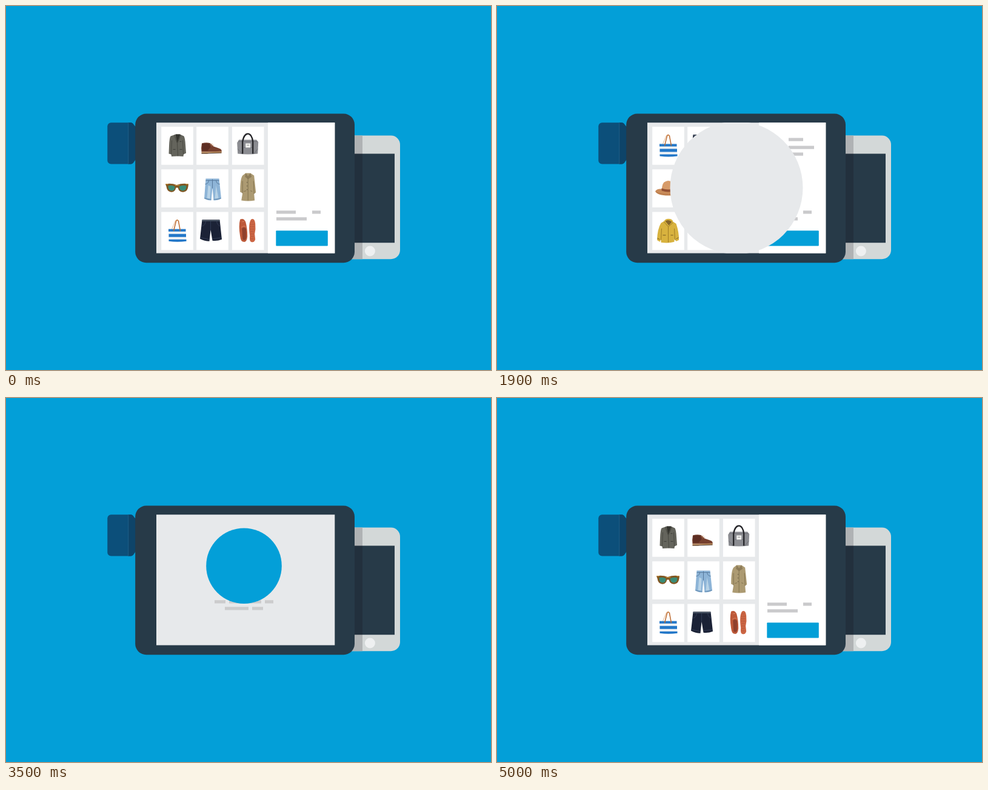
These frames come from a looping animation (800x600 px, 5100 ms). An HTML page with a canvas:

```html
<!DOCTYPE html>
<html lang="en">
<head>
<meta charset="utf-8">
<title>Tablet checkout</title>
<style>
html, body { margin: 0; width: 100%; height: 100%; overflow: hidden; background: #039fd8; }
canvas { display: block; }
</style>
</head>
<body>
<canvas id="stage" width="800" height="600"></canvas>
<script>
const ctx = document.getElementById('stage').getContext('2d');
const BLUE = '#039fd8', DARK = '#273a48', PALE = '#e7e9eb', SILVER = '#d3d8d8', BAR = '#cacacc';
const LOOP = 5100, TICK = 100;
const SCREEN = { x: 248, y: 192.3, w: 294.3, h: 215.2 };
const COLS = [282.5, 340.5, 399.2], ROW_TOP = 230.4, PITCH = 70.2;

const clamp = (v, lo = 0, hi = 1) => Math.min(hi, Math.max(lo, v));
const mix = (a, b, p) => a + (b - a) * p;

// Each layer is [path, colour, stroke width]; without a width it is filled.
const BLAZER = [
  ['M-5-18L-2-19H4L11-16Q13-12 13.500-2L14.500 12L10.500 14L10 17.500L1 17L-9.500 17.500L-10 14L-14 13L-13.500 0Q-13-13-11-16Z', '#64645c'],
  ['M-3-19L0-5L5-19Z', '#34342f'],
  ['M-5-18L0-4L1 17M6-18L0-4M-9-9L-10 14M9-9L10 14', '#484841', 1],
  ['M-7 6H-3M4 6H8M4-7H7', '#3d3d38', 1]
];
const BOOT = [
  ['M-17.500-4Q-11-6-4-4.500L2 1Q8 3 13 5Q16 7 15 10H-18Q-19 3-17.500-4Z', '#76402f'],
  ['M-17-4L-5-4L-3 2L-8 8H-17Z', '#5d2e23'],
  ['M-18 10H-6L15 9V12H-6L-8 13H-18Z', '#c0905f'],
  ['M-18 12.500H-8L15 11.500', '#443029', 1],
  ['M-4-2L0-3M-2 0L2-1', '#c08b63', .8]
];
const DUFFEL = [
  ['M-15-10H14L17-6L16 13Q0 15-17 13L-18-5Z', '#8b8c91'],
  ['M-16-7H16M-17 5L-10 13M10 13L16 5M-7 3H7', '#717278', 1],
  ['M-9 13V-7C-6-24 6-24 8-7V13', '#242428', 2.300],
  ['M-4-4H4V3H-4Z', '#f1f1ef'],
  ['M-2-1H2', '#777', .8]
];
const GLASSES = [
  ['M-19.500-7Q-10-9-1-5.500Q9-9 18.500-7L18-3Q17 5 11 6Q3 7 1-1H-2Q-4 7-11 6Q-17 5-18-3Z', '#805622'],
  ['M-15-4Q-9-6-4-3Q-4 4-9 4Q-15 4-15-4Z', '#398b76'],
  ['M3-3Q9-6 15-4Q15 4 9 4Q4 4 3-3Z', '#398b76'],
  ['M-19-7L-15-7M14-7L18-7M-4-5H4', '#c28d39', 1.300]
];
const DENIM = [
  ['M-11-16H11L14.500 17Q9 20 2 20L0-1L-2 20Q-8 20-13.500 17Z', '#8db4d7'],
  ['M-7-5L-9 16L-4 17L-3-3ZM6-5L4 17L10 16Z', '#b7d2e6'],
  ['M-11-13H11M0-15L0 0M-12-7Q-7-7-6-13M12-7Q7-7 6-13', '#56799c', 1],
  ['M-13 16Q-8 19-2 18M2 18Q9 19 14 16', '#6a91b5', 1.300]
];
const TRENCH = [
  ['M-4-25H4L10-21L13 7L10 9L11 20Q0 22-11 20L-9 8L-13 6Q-13-16-9-21Z', '#ac9a72'],
  ['M-4-25L0-20L4-25L6-19L0-15L-5-19Z', '#8d7c59'],
  ['M0-18V20M-9-12L-9 8M9-12L10 9M-7 5L-3 4M4 4L7 5', '#837350', 1],
  ['M-2-10H-1M-2-4H-1M-2 2H-1', '#514634', 1.300]
];
const TOTE = [
  ['M-14.500-4H14L15 17Q0 19-14 17Z', '#f0f3f6'],
  ['M-14.500-3H14V1H-14.500ZM-14 5H14.500V10H-14ZM-14 14H15V17Q0 19-14 17Z', '#2377c8'],
  ['M-6 0L-2-16Q0-20 2-16L5 0', '#bd6c32', 1.500],
  ['M-9-3L-3-17Q0-20 3-16', '#d99760', .7]
];
const NAVY = [
  ['M-17-18.500H12L15.500 14Q8 17 0 16L-3-2L-5 17Q-13 17-20.500 13Z', '#1b2236'],
  ['M-17-17H12', '#566371', 1.500],
  ['M-3-16V-2M-17-8Q-12-9-11-16M13-8Q8-9 7-16M-19 11L-5 14M0 13L15 11', '#37415a', .8]
];
const LOAFERS = [
  ['M-13-19Q-7-22-4-15Q-1-4-1 9Q-2 19-7 18Q-12 18-13 9Q-16-9-13-19Z', '#bd5939'],
  ['M-10-4Q-6-8-3-3L-3 12Q-5 17-9 14Z', '#8f412d'],
  ['M-11-6Q-6-10-3-6M-10-15L-6-16', '#dc8260', 1],
  ['M5-19Q11-22 12-12Q13-3 11 5L12 14Q10 20 5 18Q2 17 3 8Q0-12 5-19Z', '#cc6543'],
  ['M5-15H10M4-11H11M4-7H11M4-3H11M5 1H10M5 5H10M5 9H10M5 13H10', '#93452f', 1, [1, 1.500]]
];
const HAT = [
  ['M-21.500 5Q-19 0-10 1H9Q19 0 20.500 5Q17 12 0 12Q-18 12-21.500 5Z', '#c98b59'],
  ['M-11 4Q-10-10-5-11Q0-14 5-11Q10-9 11 4Q0 7-11 4Z', '#d79b69'],
  ['M-11 0Q0 4 11 0V4Q0 8-11 4Z', '#925033'],
  ['M-20 6Q-13 10 0 10Q13 10 19 6', '#b27446', 1]
];
const POLO = [
  ['M-6-18L-1-19H5L10-17Q16-13 20-2L13 3L11-1L12 20Q0 23-12 21L-11-1L-14 3L-19.500-2Q-16-13-11-16Z', '#d24150'],
  ['M-5-18L0-11L6-18L3-19H-2Z', '#922633'],
  ['M-6-18L-4-12L0-14L5-11L7-17M0-14V-4M-11-7L-11 18M11-7L11 18', '#b22f40', 1],
  ['M-19-3L-14 1M13 1L19-3', '#e66c76', 1]
];
const SATCHEL = [
  ['M-7-11Q-7-16 0-16Q8-16 8-11', '#5d3030', 1.500],
  ['M-18-11Q0-13 18-11L19 14Q0 16-18 14Z', '#46191d'],
  ['M-18-10H18L17 2Q0 5-18 2Z', '#5b2024'],
  ['M-11-9V12M11-9V12', '#a12e34', 2.600],
  ['M-12 4H-10M10 4H12M-16-7H-13', '#d8a18c', 1.500],
  ['M-18 3Q0 6 18 3', '#2c1216', 1]
];
const PARKA = [
  ['M-7-16Q-5-20 0-20Q7-20 8-15L13-12Q18 3 17.500 15L13 17L10 13V18Q0 21-12 19V13L-14 18L-18.500 15Q-18-3-12-13Z', '#d8b23e'],
  ['M-5-16Q0-20 6-15L1-9Z', '#85652a'],
  ['M-7-15L0-7L8-14M0-7V19M-11-4L-12 15M10-4L11 15', '#a17d25', 1],
  ['M-9 7L-4 7M4 7L8 7M-14 14L-18 12M13 13L17 11', '#765c24', 1]
];
const PLAID = [
  ['M-5-22L3-23L8-20Q14-18 16-8L18 10L13 13L10 17Q0 20-10 16L-12 13L-17 10L-18 5Q-15-15-10-19Z', '#495875'],
  ['M-10-18V16M-5-21V17M0-21V18M5-20V18M10-17V16M15-8V11', '#26334f', 1],
  ['M-14-12H13M-15-6H16M-16 0H17M-17 6H17M-11 12H14', '#a9616a', .8],
  ['M-7-19V16M3-20V17M12-15V13', '#8fa0bb', .6],
  ['M-5-22L0-17L6-21L2-23Z', '#2d3448']
];
const CHINO = [
  ['M-10-18H10L13 17Q7 20 2 19L0-2L-2 19Q-7 20-12 17Z', '#6579a6'],
  ['M-10-16H10M0-17V-2M-11-9Q-7-10-6-16M11-9Q7-10 6-16M-7-2L-7 15M7-2L8 15', '#4c6089', 1]
];
const GOODS = [
  BLAZER, BOOT, DUFFEL, GLASSES, DENIM, TRENCH, TOTE, NAVY, LOAFERS,
  HAT, POLO, SATCHEL, PARKA, PLAID, CHINO
].map(layers => layers.map(([d, ...style]) => [new Path2D(d), ...style]));
const POLO_INDEX = 10;

function rect(x, y, w, h, color, radius = 0) {
  ctx.fillStyle = color;
  ctx.beginPath();
  ctx.roundRect(x, y, w, h, radius);
  ctx.fill();
}

function disc(x, y, r, color) {
  ctx.fillStyle = color;
  ctx.beginPath();
  ctx.arc(x, y, r, 0, Math.PI * 2);
  ctx.fill();
}

function bars(y, color, ...spans) {
  for (const [from, to] of spans) rect(from, y, to - from, 5.3, color);
}

function drawGood(index, x, y, scale = 1) {
  ctx.save();
  ctx.translate(x, y);
  ctx.scale(scale, scale);
  for (const [path, color, width, dash] of GOODS[index]) {
    ctx.setLineDash(dash || []);
    ctx.fillStyle = ctx.strokeStyle = color;
    if (width) {
      ctx.lineWidth = width;
      ctx.stroke(path);
    } else {
      ctx.fill(path);
    }
  }
  ctx.restore();
}

function drawPhone() {
  rect(540, 213.5, 110, 203.7, SILVER, 15);
  rect(540, 243.5, 101, 146.7, DARK);
  disc(600.4, 404, 8.5, '#eef0f1');
  rect(560, 213.5, 28, 203.7, '#afb2b4');
  rect(560, 243.5, 28, 146.7, '#22303d');
}

function drawReader() {
  rect(167.3, 192.2, 44, 68.2, '#0c4f7a', 6);
  ctx.fillStyle = '#0e4469';
  ctx.fill(new Path2D('M202 192.200H206Q209 192.200 211 196L214 199V253L211 257Q209 260.400 206 260.400H202Z'));
  rect(201, 192.2, 1.3, 68.2, '#1a5b85');
}

function drawSwipe(n) {
  if (n < 29 || n > 33) return;
  const bottom = 76.7 + 133 * (n - 29), length = 98;
  rect(140.3, bottom - length, 61.8, length, SILVER, 4);
  rect(177.3, bottom - length, 13.9, length, DARK);
}

function drawStore(n) {
  const scroll = 2 * PITCH * clamp((n - 1) / 3);
  const press = n >= 6 && n <= 8 ? (9 - n) / 3 : 0;
  for (let i = 0; i < GOODS.length; i++) {
    const x = COLS[i % 3], y = ROW_TOP + PITCH * Math.floor(i / 3) - scroll;
    rect(x - 26.3, y - 31.4, 52.6, 62.8, '#fff');
    if (i === POLO_INDEX && press) rect(x - 26.3, y - 31.4, 52.6, 62.8, `rgba(215,220,223,${press * .6})`);
    drawGood(i, x, y);
  }

  rect(432, 192, 111, 216, '#fff');
  bars(337.2, BAR, [446, 478], [505, 519]);
  bars(348.2, BAR, [446, 496]);
  rect(445.3, 370.2, 85.5, 25.2, BLUE, 1);

  if (n >= 6) {
    const p = clamp((n - 5) / 5);
    drawGood(POLO_INDEX, mix(COLS[1], 456.8, p), mix(ROW_TOP + PITCH, 229, p), mix(1, .71, p));
  }
  const wipe = 14 * clamp(n - 10, 0, 3);
  if (wipe) {
    [[217.4, 24], [230.4, 42], [241.4, 24]].forEach(([y, w]) => bars(y, BAR, [481, 481 + Math.min(w, wipe)]));
  }
}

function drawPrompt(n) {
  const p = clamp((n - 21) / 4);
  ctx.save();
  ctx.translate(0, -111 * (1 - p));
  disc(390.3, 274.4, 29, BLUE);
  rect(373, 260.8, 50.2, 31.2, SILVER, 2.5);
  rect(373, 267.3, 50.2, 7, DARK);
  rect(377, 281.2, 23, 1.5, '#f1f3f3');
  rect(403, 281.2, 6, 1.5, '#f1f3f3');
  rect(377, 285.3, 17, 1.5, '#f1f3f3');
  ctx.restore();

  ctx.save();
  ctx.globalAlpha = p;
  ctx.translate(0, 14 * (1 - p));
  bars(320.3, '#667079', [366, 390], [394, 401], [405, 418]);
  bars(333.3, '#cccccd', [344, 362], [368, 421], [427, 441]);
  bars(344.2, '#cccccd', [361, 400], [406, 424]);
  ctx.restore();
}

function drawCheck(p) {
  if (!p) return;
  ctx.save();
  ctx.strokeStyle = PALE;
  ctx.lineWidth = 9;
  ctx.setLineDash([63.2 * p, 100]);
  ctx.stroke(new Path2D('M366.500 305.500L382 321L410 290'));
  ctx.restore();
}

function drawScreen(n) {
  const { x, y, w, h } = SCREEN;
  rect(x, y, w, h, PALE);
  ctx.save();
  ctx.beginPath();
  ctx.rect(x, y, w, h);
  ctx.clip();
  if (n < 22) {
    drawStore(n);
    if (n >= 17) disc(395, 299.7, 36.5 * (n - 16), PALE);
  } else if (n < 40) {
    drawPrompt(n);
    const k = n - 34;
    if (k > 0) disc(390.5 + 2 * k, 274.7 + 2 * k, 29 + 33.3 * k, BLUE);
  } else {
    rect(x, y, w, h, BLUE);
    drawCheck(clamp((n - 40) / 2));
    if (n >= 45) disc(395, 299.7, 36.5 * (n - 44), PALE);
  }
  ctx.restore();
}

function render(now) {
  const tick = Math.floor((now % LOOP) / TICK);
  const n = tick >= 50 ? 0 : tick;
  rect(0, 0, 800, 600, BLUE);
  drawPhone();
  drawSwipe(n);
  drawReader();
  rect(213.2, 177.6, 361.8, 245.6, DARK, 18);
  drawScreen(n);
}

const start = performance.now();
function loop() {
  render(performance.now() - start);
  requestAnimationFrame(loop);
}
loop();
</script>
</body>
</html>
```
